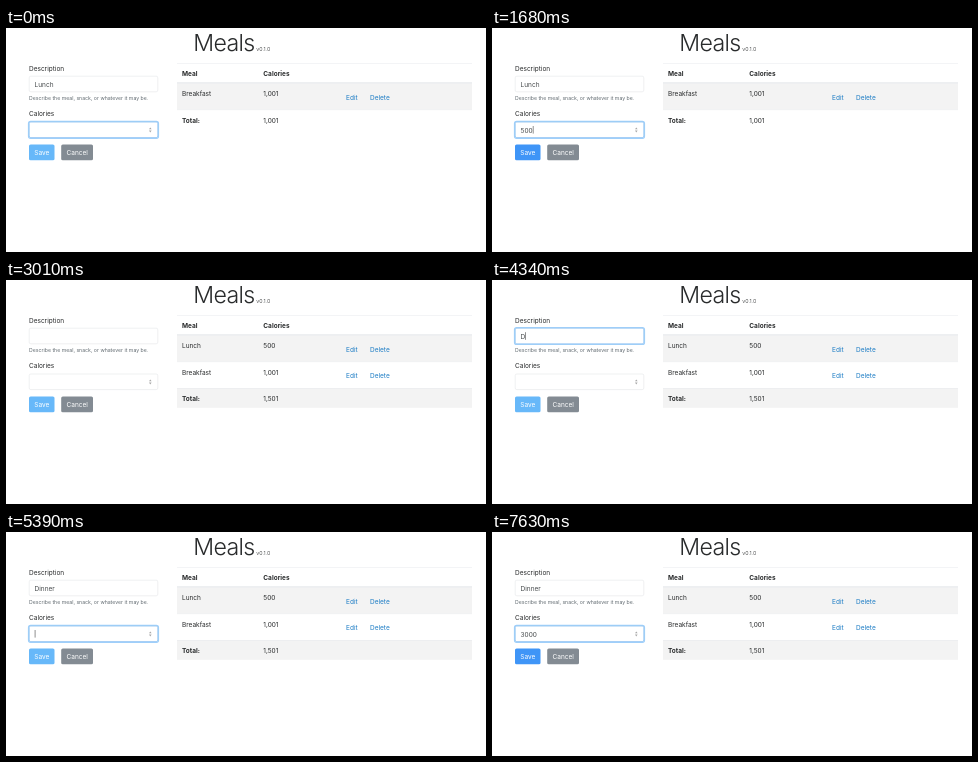
These frames come from a looping animation (480x224 px, 8000 ms). An HTML page:

```html
<!DOCTYPE html>
<html lang="en">
<head>
<meta charset="utf-8">
<title>Meals</title>
<style>
html, body { margin: 0; width: 100%; height: 100%; overflow: hidden; background: #fff; }
svg { display: block; font: 6.5px Inter, "Open Sans", sans-serif; fill: #292b2c; }
.bold { font-weight: 700; }
.link { fill: #1a7bc4; }
.light { fill: #fff; }
</style>
</head>
<body>
<svg id="stage" width="480" height="224" viewBox="0 0 480 224"></svg>
<script>
const LOOP = 8000;
const stage = document.getElementById('stage');
const pen = document.createElement('canvas').getContext('2d');
pen.font = '6.5px Inter, "Open Sans", sans-serif';

const text = (x, y, value, attrs = '') => `<text x="${x}" y="${y}" ${attrs}>${value}</text>`;
const rect = (x, y, w, h, fill, attrs = '') =>
  `<rect x="${x}" y="${y}" width="${w}" height="${h}" fill="${fill}" ${attrs}/>`;
const button = (x, y, w, label, fill) =>
  rect(x, y, w, 15.8, fill, 'rx="1.6"') + text(x + 5.3, y + 10.3, label, 'class="light"');

// Latest value of a track of [time, value] steps
const at = (track, t) => track.reduce((value, [start, next]) => t >= start ? next : value, track[0][1]);
const typed = (word, times) => times.map((time, i) => [time, word.slice(0, i + 1)]);

const description = [[0, 'Lunch'], [1890, ''], ...typed('Dinner', [4340, 4550, 4760, 4900, 4970, 5110])];
const calories = [[0, ''], ...typed('500', [630, 840, 980]), [1890, ''],
  ...typed('3000', [7000, 7280, 7490, 7630])];
const caret = [[0, 0], [420, 1], [1050, 0], [1680, 1], [1890, 0], [3710, 1], [4060, 0], [4340, 1],
  [5250, 0], [5390, 1], [5880, 0], [6440, 1], [7630, 0]];
const descriptionFocus = [[0, 0], [3850, 1], [5250, .5], [5320, .15], [5390, 0]];
const caloriesFocus = [[0, 1], [1890, 0], [5250, .5], [5320, .85], [5390, 1]];

function field(y, value, focus, showCaret) {
  const end = 28.6 + pen.measureText(value).width;
  return rect(22.6, y - .4, 129.8, 16.8, 'none', `rx="2" stroke="#9fd0fb" stroke-width="1.4" opacity="${focus}"`) +
    rect(23.2, y + .2, 128.6, 15.6, '#fff', 'rx="1.6" stroke="#dfe1e3" stroke-width=".5"') +
    rect(23.2, y + .2, 128.6, 15.6, 'none', `rx="1.6" stroke="#75b9f8" stroke-width=".6" opacity="${focus}"`) +
    text(28.6, y + 10.7, value, 'fill="#464a4c"') +
    (showCaret ? rect(end + .2, y + 4.2, .5, 7.6, '#222') : '');
}

function form(t) {
  const inDescription = t >= 3010 && t < 5250;
  const amount = at(calories, t), on = at(caret, t);
  return text(23, 42.5, 'Description') +
    field(48, at(description, t), at(descriptionFocus, t), on && inDescription) +
    text(23, 72, 'Describe the meal, snack, or whatever it may be.', 'font-size="5.2" fill="#636c72"') +
    text(23, 88.2, 'Calories') +
    field(93.8, amount, at(caloriesFocus, t), on && !inDescription) +
    '<path d="M143 101.2l1.3-1.8 1.3 1.8zM143 102.6l1.3 1.8 1.3-1.8z" fill="#a5a5a5"/>' +
    button(23, 116.5, 25.5, 'Save', amount ? '#3f95f7' : '#67b8f9') +
    button(55.2, 116.5, 31.8, 'Cancel', '#838b93');
}

function table(meals, total) {
  const bottom = 55.2 + 26.4 * meals.length;
  const line = (y, h = .5) => rect(171, y, 295, h, '#e6e9ec');
  const rows = meals.map(([name, amount], i) => {
    const y = 55.2 + 26.4 * i;
    return (i % 2 ? '' : rect(171, y, 295, 26.4, '#f3f3f3')) + line(y) +
      text(176, y + 13.2, name) + text(257.3, y + 13.2, amount) +
      text(340, y + 16.4, 'Edit', 'class="link"') + text(364, y + 16.4, 'Delete', 'class="link"');
  });
  return line(35.2) + line(54.3, .9) +
    text(176, 47.6, 'Meal', 'class="bold"') + text(257.3, 47.6, 'Calories', 'class="bold"') +
    rows.join('') + (meals.length % 2 ? '' : rect(171, bottom, 295, 19.8, '#f3f3f3')) + line(bottom) +
    text(176, bottom + 13.2, 'Total:', 'class="bold"') + text(257.3, bottom + 13.2, total);
}

function scene(t) {
  const breakfast = ['Breakfast', '1,001'];
  const listing = t >= 1890 && t < 3010;
  return text(187.3, 23.2, 'Meals', 'font-size="23.2" font-weight="300" letter-spacing="-.7"') +
    text(250.2, 23, 'v0.1.0', 'font-size="5.4" font-weight="300"') +
    (listing ? button(17, 35, 39.2, 'Add Meal', t < 2520 ? '#3f95f7' : '#3a83dc') : form(t)) +
    (t < 1890 ? table([breakfast], '1,001') : table([['Lunch', '500'], breakfast], '1,501'));
}

let shown;
function draw() {
  const markup = scene(performance.now() % LOOP);
  if (markup !== shown) stage.innerHTML = shown = markup;
  requestAnimationFrame(draw);
}
draw();
</script>
</body>
</html>
```
